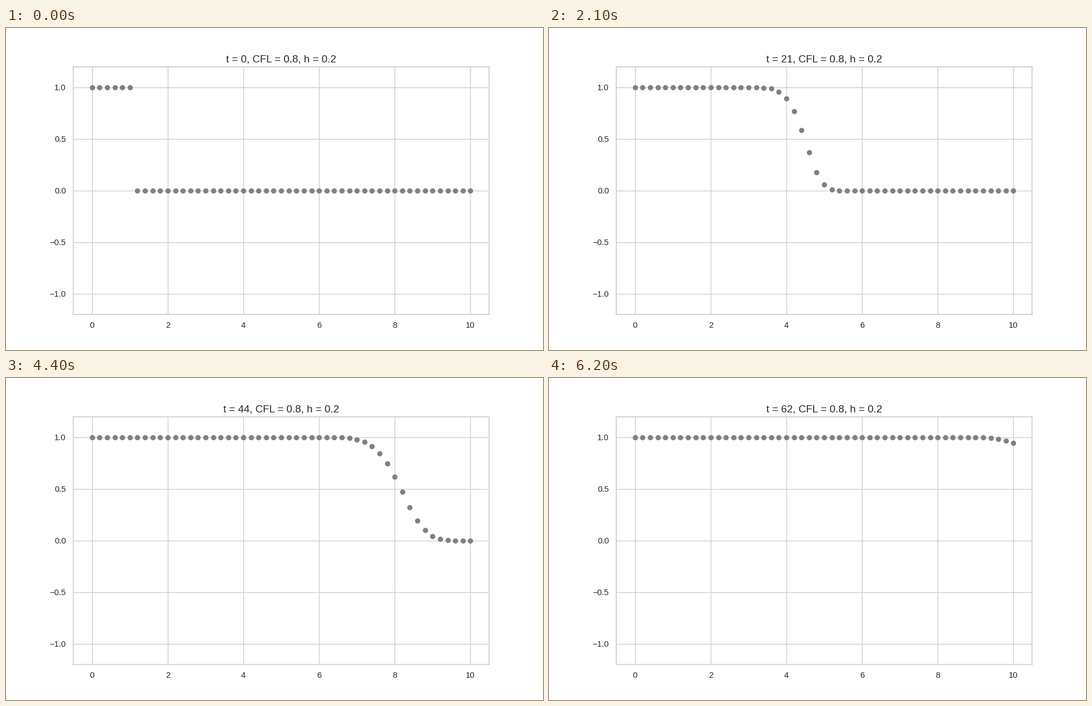
A matplotlib script for the animation above (6300 ms loop, 966x580 px).

```python
import numpy as np
import matplotlib.pyplot as plt
from matplotlib.animation import FuncAnimation

DPI = 96.6
WIDTH, HEIGHT = 966, 580
EPS = 1e-6  # keeps the pixel size from being truncated one short
STEPS = 63
CFL, H = 0.8, 0.2
TEXT, LINE = "0.15", "0.8"

plt.rcParams.update({
    "font.family": "Liberation Sans",
    "text.color": TEXT,
    "xtick.labelsize": 11,
    "ytick.labelsize": 11,
    "xtick.color": TEXT,
    "ytick.color": TEXT,
    "xtick.major.size": 6,
    "ytick.major.size": 6,
    "xtick.bottom": False,
    "ytick.left": False,
    "axes.edgecolor": LINE,
    "axes.linewidth": 1.25,
    "axes.axisbelow": True,
    "axes.grid": True,
    "grid.color": LINE,
    "grid.linewidth": 1,
})


def solve(x):
    """Upwind advection of a step, one row per time step."""
    u = np.where(x < 1 + H / 2, 1.0, 0.0)
    rows = [u]
    for _ in range(STEPS - 1):
        u = u.copy()
        u[1:] -= CFL * (u[1:] - u[:-1])
        rows.append(u)
    return rows


x = np.linspace(0, 10, 51)
states = solve(x)

fig, ax = plt.subplots(
    figsize=((WIDTH + EPS) / DPI, (HEIGHT + EPS) / DPI), dpi=DPI)
ax.set_xlim(-0.5, 10.5)
ax.set_ylim(-1.2, 1.2)
ax.set_xticks(range(0, 11, 2))
ax.set_yticks(np.arange(-1, 1.5, 0.5))
dots, = ax.plot(x, states[0], "o", color="gray", markersize=6)
title = ax.set_title("", fontsize=14)


def update(step):
    dots.set_ydata(states[step])
    title.set_text(f"t = {step}, CFL = {CFL}, h = {H}")
    return dots, title


anim = FuncAnimation(fig, update, frames=STEPS, interval=100, repeat=True)
plt.show()
```
